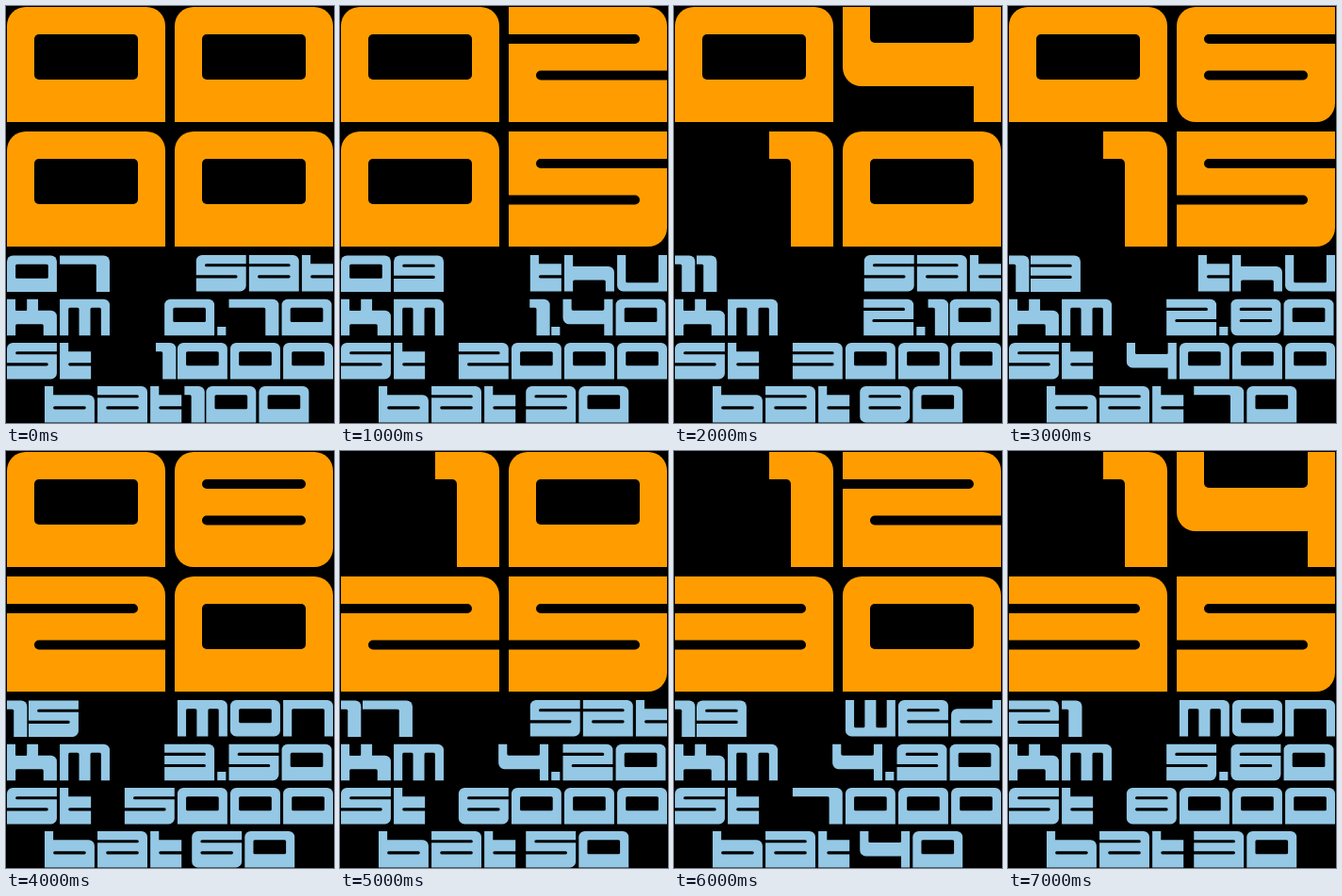
These frames come from a looping animation (348 px wide and 442 px high, 8 s). An HTML page with a canvas:

```html
<!DOCTYPE html>
<html lang="en">
<head>
<meta charset="utf-8">
<title>Watch face</title>
<style>
html, body { margin: 0; width: 100%; height: 100%; overflow: hidden; background: #000; }
canvas { display: block; }
</style>
</head>
<body>
<canvas width="348" height="442"></canvas>
<script>
const ctx = document.querySelector('canvas').getContext('2d');
const ORANGE = '#ff9d00', BLUE = '#94c8e5';
const W = 168, H = 122, STEM = 29, INNER = W - 2 * STEM, GAP = 10, R = 20;
const TOP = 29, LOW = 67.5, SMALL = 0.315;

// A box is [x, y, width, height, radii]; corners are flagged TL, TR, BR, BL.
const radii = flags => [...flags].map(f => f * R);
const block = (flags, w = W, y = 0, h = H - y) => [0, y, w, h, radii(flags)];
const leftStem = [0, 0, STEM, H, 0];
const rightStem = [W - STEM, 0, STEM, H, 0];

// Cuts run a little past open edges so that only inner ends look round.
const closed = y => [STEM, y, INNER, 10, 5];
const openLeft = y => [-5, y, W - STEM + 5, 10, 5];
const openRight = y => [STEM, y, W - STEM + 5, 10, 5];
const fromTop = (depth, x = STEM, w = INNER) => [x, -9, w, depth + 9, 5];
const fromBottom = (y, x = STEM, w = INNER) => [x, y, w, H - y + 5, 5];
const counter = [STEM, TOP, INNER, 48, 5];

const glyph = (solids, cuts = [], width = W) => ({ solids, cuts, width });
const font = {
  0: glyph([block('1100')], [counter]),
  1: glyph([block('0100', 68)], [fromBottom(TOP, -5, 28)], 68),
  2: glyph([block('0100')], [openLeft(TOP), openRight(LOW)]),
  3: glyph([block('0100')], [openLeft(TOP), openLeft(LOW)]),
  4: glyph([block('0001', W, 0, 84), rightStem], [fromTop(38)]),
  5: glyph([block('0010')], [openRight(TOP), openLeft(LOW)]),
  6: glyph([block('1011')], [openRight(TOP), closed(LOW)]),
  7: glyph([block('0100')], [fromBottom(TOP, -5, 128)]),
  8: glyph([block('1111')], [closed(TOP), closed(LOW)]),
  9: glyph([block('1100')], [closed(TOP), openLeft(LOW)]),
  a: glyph([block('0100')], [openLeft(TOP), closed(LOW)]),
  b: glyph([leftStem, block('0100', W, TOP)], [closed(LOW)]),
  d: glyph([rightStem, block('1000', W, TOP)], [closed(LOW)]),
  e: glyph([block('1100')], [closed(TOP), openRight(LOW)]),
  h: glyph([leftStem, block('0100', W, 38)], [fromBottom(84)]),
  k: glyph([leftStem, [67, 0, 38, 60, 0], block('0100', W, 38)],
    [fromTop(38, STEM, 38), fromBottom(84, STEM, 94)]),
  m: glyph([block('0100')], [fromBottom(TOP, STEM, 36), fromBottom(TOP, 103, 36)]),
  n: glyph([block('0100')], [fromBottom(TOP)]),
  o: glyph([block('1111')], [counter]),
  s: glyph([block('1010')], [openRight(TOP), openLeft(LOW)]),
  t: glyph([leftStem, block('0000', 105, TOP)], [openRight(LOW)], 105),
  u: glyph([block('0001')], [fromTop(H - TOP)]),
  w: glyph([block('0001')], [fromTop(H - TOP, STEM, 36), fromTop(H - TOP, 103, 36)]),
  '.': glyph([[0, H - STEM, STEM, STEM, 0]], [], STEM),
  ' ': glyph([], [], 15)
};
const advance = c => font[c].width + (c === '1' ? GAP / 2 : GAP);

function fillBoxes(boxes, color) {
  ctx.fillStyle = color;
  ctx.beginPath();
  for (const box of boxes) ctx.roundRect(...box);
  ctx.fill();
}

function drawGlyph(c, x, y, scale, color) {
  const { solids, cuts, width } = font[c];
  ctx.save();
  ctx.translate(x, y);
  ctx.scale(scale, scale);
  fillBoxes(solids, color);
  ctx.beginPath();
  ctx.rect(-5, -9, width + 10, H + 14);
  ctx.clip();
  fillBoxes(cuts, '#000');
  ctx.restore();
}

function text(str, x, y) {
  for (const c of str) {
    drawGlyph(c, x, y, SMALL, BLUE);
    x += advance(c) * SMALL;
  }
}

function textRight(str, right, y) {
  const width = [...str].reduce((sum, c) => sum + advance(c), -GAP);
  text(str, right - width * SMALL, y);
}

function bigPair(value, y) {
  [...String(value).padStart(2, '0')].forEach((c, i) =>
    drawGlyph(c, 1 + i * (W + GAP) + W - font[c].width, y, 1, ORANGE));
}

const weekdays = ['sat', 'thu', 'sat', 'thu', 'mon', 'sat', 'wed', 'mon'];

function draw(now) {
  const step = Math.floor(now / 1000) % 8;
  ctx.fillStyle = '#000';
  ctx.fillRect(0, 0, 348, 442);
  bigPair(step * 2, 1);
  bigPair(step * 5, 133);
  text(String(7 + step * 2).padStart(2, '0'), 1, 264.5);
  textRight(weekdays[step], 347, 264);
  text('km', 1, 310.7);
  textRight((0.7 * (step + 1)).toFixed(2), 345.5, 310.7);
  text('st', 1, 357);
  textRight(String(1000 * (step + 1)), 347, 357);
  text('bat' + String(100 - step * 10).padStart(3, ' '), 41, 403);
}

let start;
function tick(now) {
  start ??= now;
  draw(now - start);
  requestAnimationFrame(tick);
}
requestAnimationFrame(tick);
</script>
</body>
</html>
```
